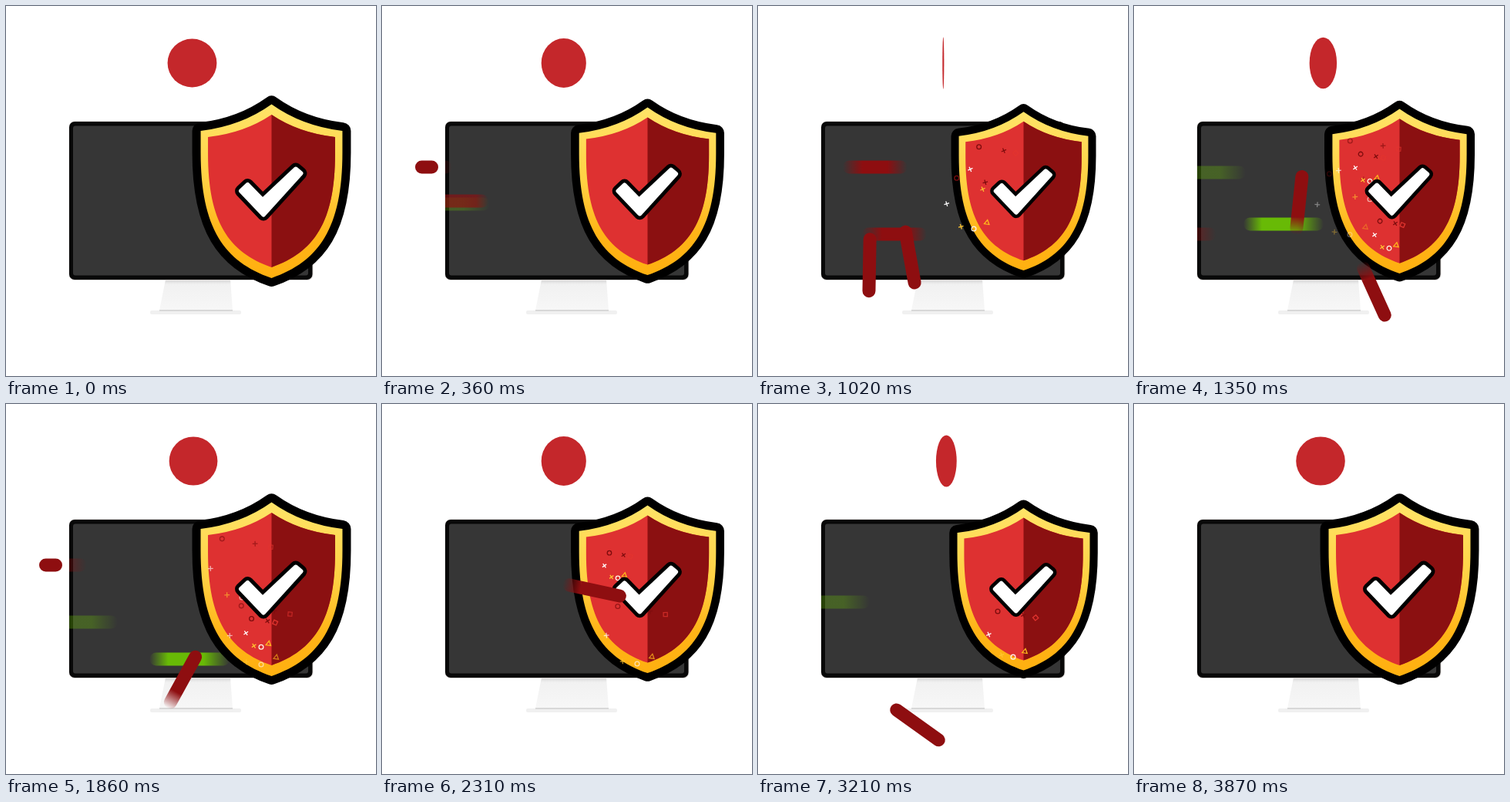
Write an HTML page with a canvas that moves like this. It is 480 px wide and 480 px high and loops after 3900 ms.

```html
<!DOCTYPE html>
<html lang="en">
<head>
<meta charset="utf-8">
<title>Security shield</title>
<style>
html, body { margin: 0; width: 100%; height: 100%; overflow: hidden; background: #fff; }
canvas { display: block; width: 480px; height: 480px; }
</style>
</head>
<body>
<canvas id="stage" width="480" height="480"></canvas>
<script>
const ctx = document.getElementById('stage').getContext('2d');
const LOOP = 3900, STEP = 30, SPEED = 0.66, GRAVITY = 0.0012;
const RED = '142,14,16', GREEN = '104,186,6';
const THICK = 17, LEN = 84;
const clamp = (v, a = 0, b = 1) => Math.min(b, Math.max(a, v));

// at: moment of impact, x/y: impact point, v: rebound velocity, spin: degrees per ms
const hits = [
  { at: 575, x: 280, y: 253, v: [-0.21, -0.08], spin: -0.2, softRight: true },
  { at: 686, x: 306, y: 209, v: [-0.2, 0.15], spin: -0.3, softRight: true },
  { at: 1190, x: 306, y: 209, v: [-0.31, 0.19], spin: -0.525 },
  { at: 1190, x: 331, y: 296, v: [0.14, 0.37], spin: 0.41 },
  { at: 1690, x: 331, y: 296, v: [-0.35, 0.26], spin: -0.36 },
  { at: 2165, x: 306, y: 209, v: [0.08, 0.14], spin: 0.084 },
  { at: 2855, x: 331, y: 296, v: [-0.231, 0.126], spin: 0.1 }
];

// [moment the leading end reaches x = 145, lane]
const passes = [[368, 257], [1350, 216], [1197, 283], [1860, 283], [1640, 331], [2666, 331], [3210, 257]];

const bits = [
  ['ring', -12, -15, '#7d0c0d'], ['cross', 8, -12, '#7d0c0d'],
  ['box', 17.5, -10, '#e2342f'], ['cross', -19, 3, '#fff'],
  ['cross', -9, 19, '#ffc52f'], ['ring', 0, 20.5, '#fff3e8'],
  ['tri', 9, 16, '#ffb81c']
];

function roundRect(x, y, w, h, r, fill) {
  ctx.beginPath();
  ctx.roundRect(x, y, w, h, r);
  ctx.fillStyle = fill;
  ctx.fill();
}

function poly(points) {
  ctx.beginPath();
  points.forEach(p => ctx.lineTo(p[0], p[1]));
  ctx.closePath();
}

// Capsule from x to x + w, centred on y, with faded ends
function bar(x, y, w, rgb, softL, softR, alpha = 1) {
  const g = ctx.createLinearGradient(x, 0, x + w, 0);
  const c = a => `rgba(${rgb},${a * alpha})`;
  g.addColorStop(0, c(softL ? 0 : 1));
  g.addColorStop(clamp(softL / w, 0, 0.5), c(1));
  g.addColorStop(1 - clamp(softR / w, 0, 0.5), c(1));
  g.addColorStop(1, c(softR ? 0 : 1));
  roundRect(x, y - THICK / 2, w, THICK, THICK / 2, g);
}

function clipped(x, y, w, h, draw) {
  ctx.save();
  ctx.beginPath();
  ctx.rect(x, y, w, h);
  ctx.clip();
  draw();
  ctx.restore();
}

function monitor() {
  const g = ctx.createLinearGradient(0, 355, 0, 395);
  g.addColorStop(0, '#d6d6d6');
  g.addColorStop(0.15, '#f1f1f1');
  g.addColorStop(1, '#f7f7f7');
  poly([[207, 355], [291, 355], [294, 395], [199, 395]]);
  ctx.fillStyle = g;
  ctx.fill();
  roundRect(187, 395, 118, 5, 2, '#f0f0f0');
  roundRect(199, 394, 95, 2, 0, '#d8d8d8');
  roundRect(81.5, 149.5, 317, 206.5, 8, '#d9d5d3');
  roundRect(82, 150, 315.5, 205, 7, '#080808');
  roundRect(87, 155.5, 305, 194, 3, '#363636');
}

function emblem(t) {
  const a = (t / LOOP * 360 - 5) * Math.PI / 180;
  const r = 31.5, k = 0.36 * Math.sin(a), q = 1 - k * k;
  ctx.beginPath();
  ctx.ellipse(240.5 - r * k * Math.cos(a), 74, r * Math.abs(Math.cos(a)) / q + 0.5, r / Math.sqrt(q), 0, 0, 7);
  ctx.fillStyle = '#c4272b';
  ctx.fill();
}

function shieldPath(top, shoulder, half, side, bottom) {
  const m = 344.5, drop = bottom - side;
  const dip = top + (shoulder - top) * 0.82;
  const x = k => m + half * k, y = k => side + drop * k;
  ctx.beginPath();
  ctx.moveTo(m, top);
  ctx.quadraticCurveTo(x(0.43), dip, x(1), shoulder);
  ctx.lineTo(x(1), side);
  ctx.bezierCurveTo(x(1), y(0.6), x(0.67), y(0.87), m, bottom);
  ctx.bezierCurveTo(x(-0.67), y(0.87), x(-1), y(0.6), x(-1), side);
  ctx.lineTo(x(-1), shoulder);
  ctx.quadraticCurveTo(x(-0.43), dip, m, top);
  ctx.closePath();
}

// Runs draw in the pulsing frame of the shield
function pulsing(t, draw) {
  const s = 0.955 + 0.045 * Math.cos((t + 55) / 1950 * 2 * Math.PI);
  ctx.save();
  ctx.translate(344.5, 240);
  ctx.scale(s, s);
  ctx.translate(-344.5, -240);
  ctx.lineJoin = 'round';
  draw();
  ctx.restore();
}

function shield() {
  const gold = ctx.createLinearGradient(0, 128, 0, 353);
  gold.addColorStop(0, '#ffe468');
  gold.addColorStop(0.45, '#ffd042');
  gold.addColorStop(0.75, '#ffb417');
  gold.addColorStop(1, '#ffb010');
  shieldPath(127.5, 162, 92, 190, 353);
  ctx.lineWidth = 22;
  ctx.strokeStyle = '#000';
  ctx.stroke();
  ctx.fillStyle = gold;
  ctx.fill();

  const face = color => {
    shieldPath(141, 170, 82.5, 192, 339);
    ctx.fillStyle = color;
    ctx.fill();
  };
  face('#de3131');
  clipped(344.5, 100, 120, 280, () => face('#8b1011'));
}

function tick() {
  poly([[305, 240], [313.5, 232], [333, 252], [376, 211.5], [382.5, 217], [334, 270.5]]);
  ctx.lineWidth = 16;
  ctx.strokeStyle = '#000';
  ctx.stroke();
  ctx.lineWidth = 6;
  ctx.strokeStyle = ctx.fillStyle = '#fff';
  ctx.stroke();
  ctx.fill();
}

function burst(hit, t) {
  const age = t - hit.at;
  if (age <= 0 || age > 950) return;
  const spread = 2.4 * (1 - Math.exp(-age / 300));
  const r = 3.2 * clamp(0.35 + spread * 0.65);
  ctx.save();
  ctx.globalAlpha = clamp((950 - age) / 450);
  ctx.lineWidth = 1.3;
  for (const [kind, dx, dy, color] of bits) {
    ctx.save();
    ctx.translate(hit.x + dx * spread, hit.y - 2 + dy * spread);
    ctx.strokeStyle = color;
    ctx.beginPath();
    if (kind === 'ring') ctx.arc(0, 0, r * 0.9, 0, 7);
    else if (kind === 'box') {
      ctx.rotate(age / 400);
      ctx.rect(-r * 0.8, -r * 0.8, r * 1.6, r * 1.6);
    } else if (kind === 'tri') poly([[1, -r], [r, r * 0.9], [-r, r * 0.6]]);
    else {
      ctx.rotate(age / 900);
      const d = r * 0.75;
      ctx.moveTo(-d, -d); ctx.lineTo(d, d);
      ctx.moveTo(d, -d); ctx.lineTo(-d, d);
    }
    ctx.stroke();
    ctx.restore();
  }
  ctx.restore();
}

function threat(hit, t) {
  const age = t - hit.at;
  if (age < 0) {
    const right = hit.x + SPEED * age;
    if (right < 82) return;
    const alpha = clamp((right - 40) / 150, 0.4, 1);
    const softL = hit.softRight ? 0 : 26, softR = hit.softRight ? 16 : 26;
    clipped(82, 140, 300, 220, () => bar(right - LEN, hit.y, LEN, RED, softL, softR, alpha));
    // tail still outside the screen on the upper lane
    const left = Math.max(43, right - 62);
    if (hit.y === 209 && left < 65) bar(left, 209, 73 - left, RED, 0, 0);
    return;
  }
  const x = hit.x - LEN / 2 + hit.v[0] * age;
  const y = hit.y + hit.v[1] * age + GRAVITY * age * age / 2;
  if (y > 560) return;
  const soft = (hit.softRight ? 14 : 24) * clamp((320 - age) / 150);
  ctx.save();
  ctx.translate(x, y);
  ctx.rotate(hit.spin * age * Math.PI / 180);
  bar(-LEN / 2, 0, LEN, RED, hit.softRight ? 0 : soft, hit.softRight ? soft : 0);
  ctx.restore();
}

function packet([at, y], t) {
  const right = 145 + SPEED * (t - at);
  if (right < 82 || right > 450) return;
  bar(right - 104, y, 104, GREEN, 24, 34, clamp(0.33 + (right - 145) / 150, 0.25, 1));
}

function draw(t) {
  ctx.fillStyle = '#fff';
  ctx.fillRect(0, 0, 480, 480);
  emblem(t);
  monitor();
  clipped(82, 150, 258, 205, () => passes.forEach(p => packet(p, t)));
  pulsing(t, shield);
  hits.forEach(h => burst(h, t));
  pulsing(t, tick);
  hits.forEach(h => threat(h, t));
}

const start = performance.now();
function frame() {
  const t = (performance.now() - start) % LOOP;
  draw(Math.floor(t / STEP) * STEP);
  requestAnimationFrame(frame);
}
frame();
</script>
</body>
</html>
```
